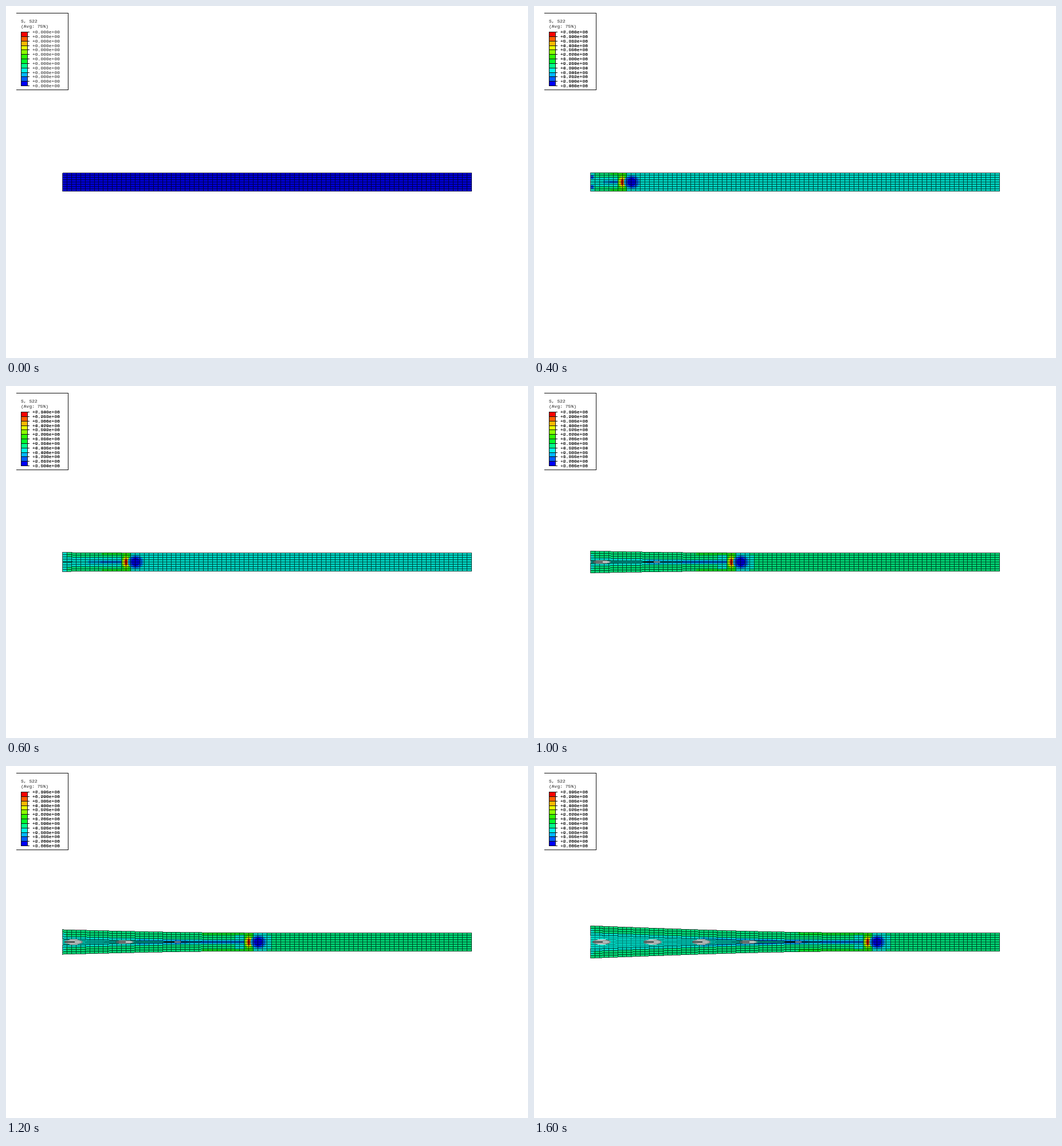
An HTML page that plays this animation: 911 px wide and 615 px high, repeating every 1800 ms.

```html
<!DOCTYPE html>
<html lang="en">
<head>
<meta charset="utf-8">
<title>Beam crack stress</title>
<style>
html, body { margin: 0; width: 100%; height: 100%; overflow: hidden; background: #fff; }
svg { display: block; width: 911px; height: 615px; }
text { font: 8px "Liberation Mono", monospace; fill: #222; white-space: pre; }
.line { fill: none; stroke: #111; stroke-width: 1; shape-rendering: crispEdges; }
.mesh { stroke: #000; stroke-opacity: 0.68; }
.faint { stroke: #000; stroke-opacity: 0.4; }
.flat { shape-rendering: crispEdges; }
</style>
</head>
<body>
<svg id="stage" viewBox="0 0 911 615"></svg>
<script>
const NS = 'http://www.w3.org/2000/svg';
const stage = document.getElementById('stage');
const STEP = 200, LOOP = 1800;
const LEFT = 98.5, MID = 307.5, COLS = 90, CELL = 714 / COLS, HALF = 16;
const TIPS = [0, 2, 7, 14, 21, 31, 41, 51, 61];
const RAMP = ['#ff0000', '#ff5d00', '#ffb900', '#e8ff00', '#8bff00', '#2eff00',
  '#00ff2e', '#00ff8b', '#00ffe8', '#00b9ff', '#005dff', '#0000ff'];

function add(parent, tag, attrs, text) {
  const el = document.createElementNS(NS, tag);
  for (const key in attrs) el.setAttribute(key, attrs[key]);
  if (text) el.textContent = text;
  parent.appendChild(el);
  return el;
}

// Model surfaces are slightly darker than the legend.
function shade(level) {
  const n = parseInt(RAMP[level].slice(1), 16);
  const rgb = [n >> 16, n >> 8 & 255, n & 255].map(v => Math.round(v * 0.84));
  return `rgb(${rgb})`;
}

const colX = c => LEFT + c * CELL;
const rowY = i => 45.5 + i * 94 / 12;

// Cantilever deflection of each arm behind the crack tip.
function bend(tip, c) {
  if (c >= tip) return 0;
  const s = (tip - c) / tip;
  return 12.3 * (tip / 61) ** 2 * (3 * s * s - s ** 3) / 2;
}

// A line along one arm; share < 1 places it inside the opened crack.
function edge(tip, side, u, from, to, share = 1) {
  const pts = [];
  for (let c = from; ; c = Math.min(to, Math.floor(c) + 1)) {
    const y = MID + side * (u + share * bend(tip, c));
    pts.push(`${colX(c).toFixed(2)} ${y.toFixed(2)}`);
    if (c >= to) return pts;
  }
}

function fillBetween(g, a, b, level) {
  const pts = a.concat(b.reverse());
  add(g, 'path', { d: `M${pts.join('L')}Z`, fill: shade(level), class: 'flat' });
}

function band(g, tip, level, u0, u1, from, to) {
  for (const side of [-1, 1]) {
    fillBetween(g, edge(tip, side, u0, from, to), edge(tip, side, u1, from, to), level);
  }
}

function blob(g, x, level, rx, ry) {
  add(g, 'ellipse', { cx: x, cy: MID, rx, ry, fill: shade(level) });
}

function mesh(g, tip) {
  let d = '';
  for (const side of [-1, 1]) {
    for (let u = side < 0 || tip ? 0 : 4; u <= HALF; u += 4) {
      d += 'M' + edge(tip, side, u, 0, side > 0 && !u ? tip : COLS).join('L');
    }
    for (let c = 0; c <= COLS; c++) {
      const y = MID + side * bend(tip, c);
      d += `M${colX(c).toFixed(2)} ${y.toFixed(2)}v${side * HALF}`;
    }
  }
  add(g, 'path', { d, class: 'line mesh' });
}

// Stretched material between the crack faces.
function gap(g, tip) {
  fillBetween(g, edge(tip, -1, 0, 0, tip), edge(tip, 1, 0, 0, tip), 8);
  let d = 'M' + edge(tip, 1, 0, 0, tip, 0).join('L');
  for (const side of [-1, 1]) {
    for (const share of [0.33, 0.67]) d += 'M' + edge(tip, side, 0, 0, tip, share).join('L');
  }
  for (let c = 0; c < tip; c++) {
    const h = bend(tip, c);
    d += `M${colX(c).toFixed(2)} ${(MID - h).toFixed(2)}v${(2 * h).toFixed(2)}`;
  }
  add(g, 'path', { d, class: 'line faint' });
}

function stress(g, tip, late, fresh) {
  band(g, tip, late ? 7 : 8, 0, HALF, 0, COLS);
  if (late) {
    band(g, tip, 8, 0, 4, 0, tip - 3);
    band(g, tip, 8, 4, 10, 0, 0.7);
    band(g, tip, 6, 11, HALF, tip * 0.75, tip);
    band(g, tip, 8, 0, 12, tip - 3, tip - 1);
    band(g, tip, 8, 0, HALF, tip + 1, tip + 4);
    band(g, tip, 8, 0, 12, tip + 4, tip + 5);
  } else {
    band(g, tip, 7, 8, HALF, Math.min(1, tip / 2), tip + 1);
    band(g, tip, 6, 12, HALF, tip * 0.62, tip + 1);
    if (fresh) band(g, tip, 10, 5, 11, 0, 0.7);
  }
  band(g, tip, 9, 0, 2, tip * 0.4, tip - 1);
  band(g, tip, 10, 0, 1.2, tip * 0.6, tip - 1);

  const x = colX(tip);
  band(g, tip, 6, 0, HALF, tip - 1, tip + 1);
  band(g, tip, 5, 10, HALF, tip - 0.6, tip + 0.6);
  blob(g, x, 4, 7, 11);
  blob(g, x, 3, 5.5, 8.5);
  blob(g, x, 2, 3.5, 7);
  blob(g, x, 0, 2, 5.5);
  blob(g, x + 17, 9, 14, 12.5);
  blob(g, x + 17, 10, 11, 10.5);
  blob(g, x + 16.5, 11, 7.5, 7.5);
}

// Thin open slits along the crack, wider further from the tip.
function slits(g, tip) {
  for (const x of [118, 207, 292, 374, 454]) {
    const reach = colX(tip) - x;
    const n = reach > 290 ? 2 : reach > 200 ? 1 : reach > 110 ? 0 : -1;
    if (n < 0) continue;
    if (n) add(g, 'ellipse', { cx: x, cy: MID, rx: 16, ry: 2 * n + 0.5, fill: '#7d8a88' });
    for (let j = -n; j <= n; j++) {
      const r = 13 - 3 * Math.abs(j);
      const stroke = j % 2 ? '#bbb' : '#fff';
      add(g, 'path', { d: `M${x - r} ${MID + 2 * j}h${2 * r}`, class: 'line', style: `stroke:${stroke}` });
    }
    add(g, 'path', { d: `M${x - 16} ${MID}h18`, class: 'line' });
  }
}

function sci(v) {
  const [m, e] = Math.abs(v).toExponential(3).split('e');
  return `${v < 0 ? '-' : '+'}${m}e+${e.slice(1).padStart(2, '0')}`;
}

function labels(g, k) {
  const step = k ? 860000 + 9000 * Math.min(k, 5) : 0;
  const top = step * (k > 4 ? 7.95 : 8.05);
  for (let i = 0; i <= 12; i++) {
    add(g, 'text', { x: 46, y: rowY(i) + 2.5 }, sci(top - i * step));
  }
}

function legend() {
  add(stage, 'path', { d: 'M18 12.5H108.5V146.5H18', class: 'line' });
  add(stage, 'text', { x: 26, y: 29 }, 'S, S22');
  add(stage, 'text', { x: 26, y: 38 }, '(Avg: 75%)');
  RAMP.forEach((fill, i) => {
    add(stage, 'rect', { x: 26, y: rowY(i), width: 12, height: 94 / 12, fill, class: 'flat' });
  });
  let d = 'M26.5 45.5V139.5M37.5 45.5V139.5';
  for (let i = 0; i <= 12; i++) d += `M26 ${rowY(i)}H41`;
  add(stage, 'path', { d, class: 'line' });
}

legend();
// The zero labels stay printed under the later values.
labels(stage, 0);

const steps = TIPS.map((tip, k) => {
  const g = add(stage, 'g', {});
  if (k) {
    labels(g, k);
    stress(g, tip, k > 4, k < 3);
    gap(g, tip);
  } else {
    band(g, 0, 11, 0, HALF, 0, COLS);
  }
  mesh(g, tip);
  if (k > 3) slits(g, tip);
  return g;
});

function draw(ms) {
  const now = Math.floor(ms % LOOP / STEP);
  steps.forEach((g, k) => g.setAttribute('display', k === now ? 'inline' : 'none'));
}

const start = performance.now();
function tick() {
  draw(performance.now() - start);
  requestAnimationFrame(tick);
}
tick();
</script>
</body>
</html>
```
